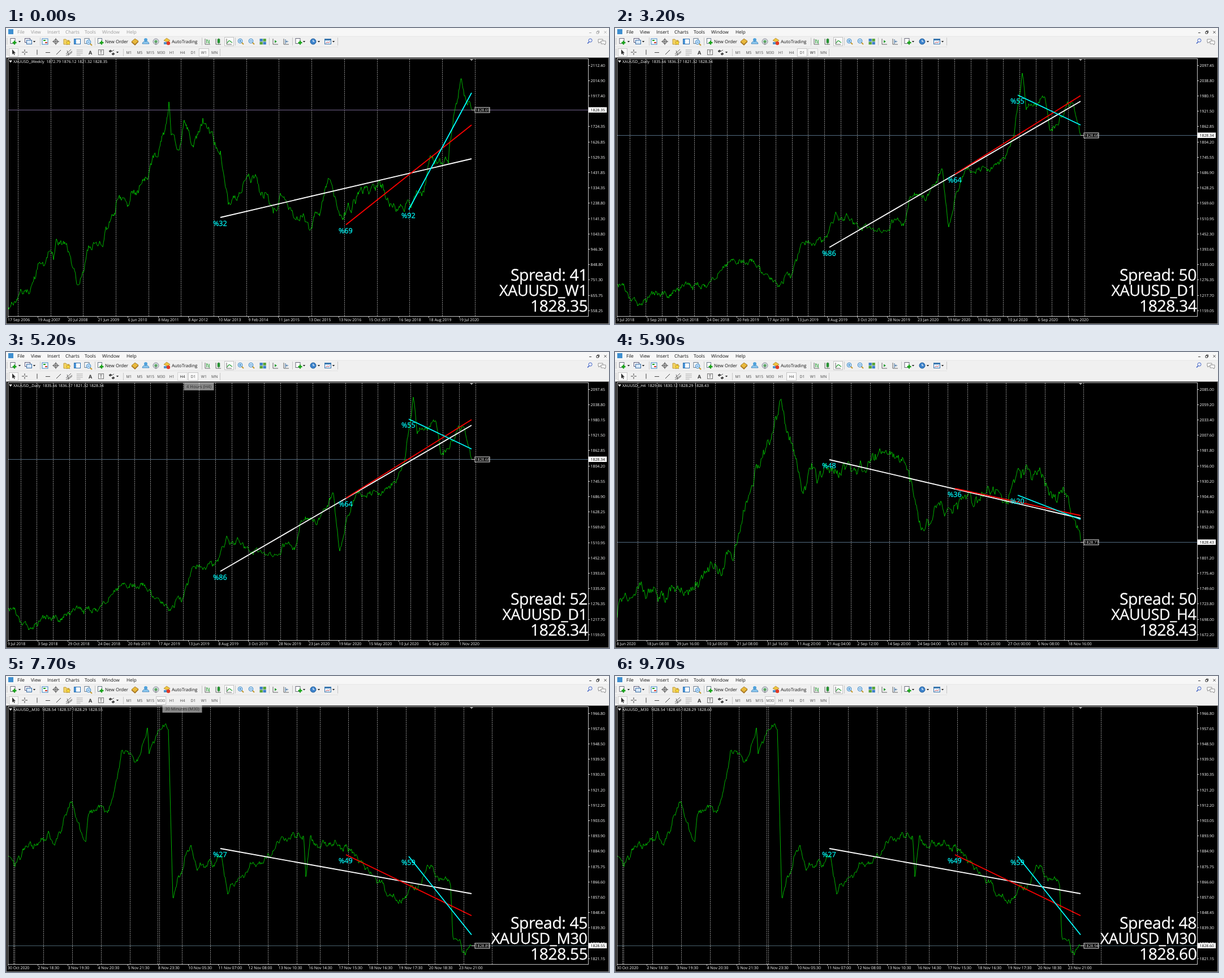
An HTML page for the animation above (10 s loop, 1066 px wide and 525 px high).

```html
<!DOCTYPE html>
<html lang="en">
<head>
<meta charset="utf-8">
<title>Chart periods</title>
<style>
html, body { margin: 0; width: 100%; height: 100%; overflow: hidden; background: #000; }
svg { display: block; width: 1066px; height: 525px; }
text { font-family: "Open Sans", "Noto Sans", sans-serif; white-space: pre; text-rendering: geometricPrecision; }
.big { letter-spacing: -0.4px; stroke: #fff; stroke-width: 0.3px; }
.mark { stroke: #0ff; stroke-width: 0.25px; }
</style>
</head>
<body>
<svg id="stage" viewBox="0 0 1066 525"></svg>
<script>
const LOOP = 10000;
const stage = document.getElementById('stage');

function add(parent, tag, attrs, content) {
  const el = document.createElementNS('http://www.w3.org/2000/svg', tag);
  for (const k in attrs) el.setAttribute(k, attrs[k]);
  if (content !== undefined) el.textContent = content;
  parent.appendChild(el);
  return el;
}
const group = parent => add(parent, 'g', {});
const rect = (p, x, y, width, height, fill, stroke = 'none') =>
  add(p, 'rect', { x, y, width, height, fill, stroke });
const path = (p, d, stroke, width = 1, fill = 'none') =>
  add(p, 'path', { d, stroke, 'stroke-width': width, fill });
const dashes = (p, d, stroke, width, pattern) =>
  path(p, d, stroke, width).setAttribute('stroke-dasharray', pattern);
const circle = (p, cx, cy, r, fill, stroke = 'none') =>
  add(p, 'circle', { cx, cy, r, fill, stroke });
const label = (p, x, y, size, fill, content, anchor = 'start', style = '') =>
  add(p, 'text', { x, y, 'font-size': size, fill, 'text-anchor': anchor, class: style }, content);

// ---- window frame and toolbars ----
rect(stage, 0, 0, 1066, 525, '#f0f0f0');
rect(stage, 0, 0, 1066, 14.5, '#f7f7f7');
rect(stage, 1, 52, 1064, 472, '#000');
path(stage, 'M0 52.5H1066M.5 52V525M1065.5 52V525M0 524.5H1066', '#8c8c8c');
path(stage, 'M0 33.5H587M0 15H1066', '#dedede', 0.7);

const menu = group(stage);
[['File', 20], ['View', 44], ['Insert', 73], ['Charts', 105], ['Tools', 139], ['Window', 170], ['Help', 213]]
  .forEach(([name, x]) => label(menu, x, 10, 8.2, 'currentColor', name));
path(menu, 'M1031 8.5h4M1044 6.5h3.5v3.5h-3.5zM1045.5 6.5v-1.5h3v3.5h-1M1057.5 5.5l4 4m0-4l-4 4', 'currentColor', 0.8);

const bar = group(stage);
rect(bar, 4, 2, 9, 9, '#3f8fd0');
for (const x of [60, 157, 346, 405, 465, 506, 586]) path(bar, `M${x}.5 17V31`, '#bbb', 0.8);
for (const x of [207, 378]) path(bar, `M${x}.5 37V50`, '#bbb', 0.8);
for (const y of [24, 43]) dashes(bar, `M2 ${y - 6}v12`, '#aaa', 1.2, '1 1');
for (const [x, y] of [[24, 23], [50, 23], [527, 23], [553, 23], [579, 23], [197, 42]])
  path(bar, `M${x - 2.2} ${y}h4.4l-2.2 2.6z`, 'none', 1, '#222');

const plus = (x, y) => path(bar, `M${x - 3.5} ${y}h7M${x} ${y - 3.5}v7`, '#16a316', 2.4);
const box = (x, y, w, h, fill, stroke) => rect(bar, x - w / 2, y - h / 2, w, h, fill, stroke);
const lens = (x, y, sign) => {
  path(bar, `M${x + 2} ${y + 2}l4 4`, '#c59a2e', 2);
  circle(bar, x, y, 3.8, '#dcefff', '#2d7fc4');
  path(bar, sign, '#2d7fc4', 1.2);
};
box(12, 23, 8, 9, '#fff', '#667'); plus(15, 26);
box(38, 22, 9, 7, '#fff', '#557'); box(41, 25, 9, 7, '#d8e8f8', '#3b6ea5');
box(69, 24, 10, 10, '#fff', '#3683c4');
path(bar, 'M66 22h4', '#20a020', 2); path(bar, 'M69 26h4', '#d03a2a', 2);
circle(bar, 88, 24, 3.5, 'none', '#444'); path(bar, 'M82 24h12M88 18v12', '#444');
path(bar, 'M102 20h4l1 2h5v7h-10z', '#b08a20', 0.8, '#f5d567');
path(bar, 'M110 22l1 2.5 3 .3-2 2 .5 3-2.5-1.5-2.5 1.5.5-3-2-2 3-.3z', '#a67b10', 0.6, '#ffdf40');
box(126, 24, 11, 9, '#fff', '#2b6fb0'); rect(bar, 121, 20, 3, 8, '#4b97da');
box(143, 23, 8, 9, '#fff', '#678'); lens(146, 25, 'M144 25h4');
box(166, 23, 7, 9, '#fff', '#678'); plus(169, 26);
label(bar, 175, 27, 8.1, '#111', 'New Order');
path(bar, 'M222 24l6-5 6 4-6 6z', '#94691a', 0.8, '#e9b93c'); path(bar, 'M222 25l6 5 6-6', '#a8741a', 1.3);
circle(bar, 247, 21, 3, '#4fa2dc'); path(bar, 'M241 28q1-5 6-4q5-1 6 4z', '#2f78b4', 0.8, '#8fcaf0');
circle(bar, 265, 24, 5, '#d7dde0', '#889'); circle(bar, 265, 24, 2.6, '#58ad62'); path(bar, 'M265 24v6', '#777');
path(bar, 'M279 22l5-4 6 4-5 3z', '#a67d18', 0.7, '#f0c541'); box(283, 27, 8, 4, '#4f93c8');
circle(bar, 287, 27, 3.2, '#e03a26');
label(bar, 293, 27, 8, '#111', 'AutoTrading');
rect(bar, 386.5, 16.5, 16, 15, '#fafafa', '#c4c4c4');
path(bar, 'M352 19v10h9M371 19v10h9M390 19v10h9', '#555', 0.9);
path(bar, 'M355 20v7m0-5h2M359 21v7m-2-3h2', '#1e9b2d', 1.1);
box(376, 23, 3.5, 6, '#28b03a', '#177a22'); path(bar, 'M376 18v11', '#177a22', 0.8);
path(bar, 'M391 27q3-6 5-4t4 3', '#1e9b2d', 1.1);
lens(414, 23, 'M412 23h4M414 21v4'); lens(433, 23, 'M431 23h4');
for (let i = 0; i < 4; i++)
  rect(bar, 448.5 + i % 2 * 6, 19 + (i >> 1) * 5.5, 5.3, 4.8, i % 3 ? '#56a436' : '#3c7fc9');
for (const x of [476, 495]) path(bar, `M${x - 4} 19v10h9`, '#555', 0.9);
path(bar, 'M475 21.5v5l4-2.5z', 'none', 1, '#1e9b2d');
path(bar, 'M494 20v8m5-4h-4m1.5-1.5l-1.5 1.5 1.5 1.5', '#35689c');
box(516, 23, 8, 9, '#fff', '#667'); plus(520, 26);
circle(bar, 543, 24, 5, '#3b82cc', '#205c98'); path(bar, 'M543 21v3h2.5', '#fff', 1.1);
box(569, 24, 11, 9, '#e7f3fd', '#3977af'); path(bar, 'M564 21h10', '#3977af', 2); path(bar, 'M565 27l3-2 2 1 3-2', '#c33', 0.8);
circle(bar, 1033, 22, 3, '#fff', '#3c5fc4'); path(bar, 'M1031 24.5l-3 3', '#3c5fc4', 1.6);
path(bar, 'M1047 20h8v5h-5l-2 2v-2h-1z', '#777', 0.8, '#fff'); path(bar, 'M1052 23h8v5h-1v2l-2-2h-5z', '#777', 0.8, '#fff');

rect(bar, 5.5, 36.5, 16, 14, '#fafafa', '#c4c4c4');
path(bar, 'M11 38v9l2-2 1.5 3 1.3-.7-1.5-2.8h2.8z', 'none', 1, '#333');
path(bar, 'M28 43h4m2 0h4M33 38v4m0 2v4M55 38.5v9M70 43.5h8M89 47l8-8', '#444');
path(bar, 'M106 46l9-8M106 49l11-8M109 49l8-6M108 40l3 8', '#555', 0.9);
dashes(bar, 'M125 39h11M125 42h11M125 45h11M125 48h7', '#777', 0.8, '1.5 .7');
label(bar, 149, 46.5, 9, '#333', 'A', 'middle').setAttribute('font-weight', 700);
box(168, 43, 9, 9, 'none', '#777'); label(bar, 168, 46.3, 8, '#333', 'T', 'middle');
path(bar, 'M182 41l3-2 2 2-3 2zM187 46l3-2 2 2-3 2z', '#333', 1, '#555'); path(bar, 'M186 42l5-3', '#555');

const buttons = {};
['M1', 'M5', 'M15', 'M30', 'H1', 'H4', 'D1', 'W1', 'MN'].forEach((name, i) => {
  const x = 217.5 + i * 18.9;
  const frame = rect(bar, x - 8.5, 36.5, 17, 14, '#fafafa', '#c4c4c4');
  const text = label(bar, x, 45.6, 6.8, '#444', name, 'middle');
  buttons[name] = { frame, text };
});

// ---- charts ----
function random(seed) {
  return () => {
    seed = (seed + 0x6D2B79F5) | 0;
    let r = Math.imul(seed ^ seed >>> 15, 1 | seed);
    r = r + Math.imul(r ^ r >>> 7, 61 | r) ^ r;
    return ((r ^ r >>> 14) >>> 0) / 4294967296;
  };
}
const parse = s => s.split(' ').map(p => p.split(',').map(Number));
const series = (from, step, n) => Array.from({ length: n }, (_, i) => from + step * i);

// Joins the turning points by midpoint displacement, like a price walk.
function walk(points, rough, seed) {
  const rnd = random(seed);
  const join = ([x0, y0], [x1, y1]) => {
    const dx = x1 - x0;
    if (dx < 1.8) return `L${x1.toFixed(1)} ${y1.toFixed(1)}`;
    const mid = [x0 + dx / 2, (y0 + y1) / 2 + (rnd() - 0.5) * rough * Math.min(5, Math.sqrt(dx))];
    return join([x0, y0], mid) + join(mid, [x1, y1]);
  };
  return 'M' + points[0] + points.slice(1).map((p, i) => join(points[i], p)).join('');
}

const weekly = parse('4,495 36,469 80,397 84,411 88,379 106,384 125,454 146,386 170,387 188,331 249,266 270,218 288,131 292,190 306,217 314,166 330,208 348,160 379,218 393,313 434,271 478,325 485,293 537,359 568,276 595,340 624,290 655,280 692,324 735,298 750,226 782,240 785,199 804,90 823,145');
const daily = parse('4,455 40,493 100,471 160,459 187,430 216,418 283,447 313,436 331,380 370,374 389,331 427,345 480,361 512,345 520,303 550,306 579,252 590,353 601,302 617,259 664,250 703,200 720,80 727,145 761,129 768,178 809,133 823,190');
const hourly = parse('4,287 28,195 38,179 72,206 78,280 95,284 97,230 140,262 174,228 192,259 229,185 256,261 289,278 330,241 350,247 357,330 385,363 405,304 412,331 468,226 474,289 504,215 514,118 552,91 557,387 570,306 600,312 606,387 656,283 715,310 748,390 782,339 803,365 806,455 823,478');
const halfHourly = parse('4,320 16,338 75,275 84,298 117,224 141,294 146,245 184,230 204,133 230,152 250,92 253,138 281,86 287,95 295,393 327,300 338,345 380,318 392,387 445,333 490,286 526,284 530,356 538,284 600,302 632,335 677,390 735,367 745,335 786,372 790,462 812,495 823,479');

// The four-hour view is the tail of the daily one, stretched.
const dailyPrice = y => 2097.45 - 58.65 * (y - 66) / 27.2;
const fourHourly = daily.filter(p => p[0] >= 664)
  .map(([x, y]) => [4 + (x - 664) * 5.151, 66 + (2085 - dailyPrice(y)) * 1.054]);
const intraday = i => 1966.8 - 0.15 * Math.ceil(60.67 * i - 0.045);

const charts = {
  W1: {
    title: 'XAUUSD_,Weekly', ohl: '1872.79 1876.12 1821.32', points: weekly, rough: 7, y: 145, bid: '#74648f',
    price: i => 2112.4 - 1.95 * Math.round(49.8333 * i - 0.01),
    days: series(21.3, 57.7, 15), trend: [336, 232, 349, 172, 322, 115], marks: [32, 69, 92],
    dates: '17 Sep 2006|19 Aug 2007|20 Jul 2008|21 Jun 2009|6 Jun 2010|8 May 2011|8 Apr 2012|10 Mar 2013|9 Feb 2014|11 Jan 2015|13 Dec 2015|13 Nov 2016|15 Oct 2017|16 Sep 2018|18 Aug 2019|19 Jul 2020'
  },
  D1: {
    title: 'XAUUSD_,Daily', ohl: '1835.66 1836.37 1821.32', points: daily, rough: 5, y: 190, bid: '#536b82',
    price: i => 2097.45 - 58.65 * i,
    days: series(26, 28.72, 29), trend: [389, 130, 259, 120, 119, 172], marks: [86, 64, 55],
    dates: '9 Jul 2018|3 Sep 2018|29 Oct 2018|24 Dec 2018|20 Feb 2019|17 Apr 2019|13 Jun 2019|8 Aug 2019|3 Oct 2019|28 Nov 2019|23 Jan 2020|19 Mar 2020|15 May 2020|10 Jul 2020|6 Sep 2020|1 Nov 2020'
  },
  H4: {
    title: 'XAUUSD_,H4', ohl: '1829.86 1830.12 1828.29', points: fourHourly, rough: 9, y: 337, bid: '#536b82',
    price: i => 2085 - 25.8 * i,
    days: series(40, 34.3, 24), trend: [191, 295, 242, 290, 254, 297], marks: [48, 36, 20],
    dates: '8 Jun 2020|18 Jun 08:00|29 Jun 16:00|10 Jul 00:00|21 Jul 08:00|31 Jul 16:00|11 Aug 20:00|21 Aug 04:00|2 Sep 12:00|14 Sep 20:00|24 Sep 04:00|6 Oct 12:00|16 Oct 20:00|27 Oct 00:00|6 Nov 08:00|18 Nov 16:00'
  },
  H1: {
    title: 'XAUUSD_,H1', points: hourly, rough: 6, y: 478, bid: '#47616c', price: intraday,
    days: [...series(9.5, 25.55, 22), ...series(32.5, 127.7, 5), ...series(567, 24.9, 12)],
    trend: [244, 367, 306, 387, 318, 426], marks: [20, 27, 49],
    dates: '8 Oct 2020|12 Oct 20:00|14 Oct 23:00|19 Oct 01:00|21 Oct 03:00|23 Oct 05:00|27 Oct 07:00|29 Oct 09:00|2 Nov 12:00|4 Nov 14:00|6 Nov 16:00|10 Nov 23:00|13 Nov 01:00|17 Nov 07:00|19 Nov 09:00|23 Nov 12:00'
  },
  M30: {
    title: 'XAUUSD_,M30', points: halfHourly, rough: 5, y: 478, bid: '#47616c', price: intraday,
    days: [...series(15.5, 51.1, 6), ...series(13.5, 255, 2), ...series(311, 50.8, 5), ...series(555, 50.8, 7)],
    trend: [306, 386, 317, 425, 320, 459], marks: [27, 49, 59],
    dates: '30 Oct 2020|2 Nov 18:30|3 Nov 19:30|4 Nov 20:30|5 Nov 21:30|8 Nov 23:30|10 Nov 05:30|11 Nov 07:00|12 Nov 08:00|13 Nov 10:30|16 Nov 14:30|17 Nov 15:30|18 Nov 16:30|19 Nov 17:30|20 Nov 18:30|23 Nov 21:00'
  }
};

Object.values(charts).forEach((c, n) => {
  const g = c.group = group(stage);
  for (const x of c.days) dashes(g, `M${Math.floor(x) + 0.5} 55V511`, '#fff', 0.7, '1.67 1.67');
  path(g, `M3 ${c.y + 0.5}H1029`, c.bid);
  path(g, walk(c.points, c.rough, 11 + n), '#0f0', 0.7);
  ['#fff', '#f00', '#0ff'].forEach((color, i) => {
    const x = [379, 601, 712][i], y = c.trend[i * 2];
    path(g, `M${x} ${y}L823 ${c.trend[i * 2 + 1]}`, color, 1.8);
    label(g, x - 0.6, y + 15, 12.6, '#0ff', '%' + c.marks[i], 'middle', 'mark');
  });
  for (let i = 0; i < 17; i++) {
    const y = 66 + i * 27.2;
    path(g, `M1029 ${Math.floor(y) + 0.5}h3`, '#fff', 0.8);
    label(g, 1033.5, y + 2.5, 6.9, '#fff', c.price(i).toFixed(2));
  }
  c.dates.split('|').forEach((date, i) => {
    const x = 3 + i * 53.2;
    path(g, `M${Math.floor(x) + 0.5} 511v3`, '#fff', 0.8);
    label(g, x, 520, 6.9, '#fff', date);
  });
});

path(stage, 'M3 54.5H1029M3 511.5H1029M1029.5 54V512M3.5 54V512', '#ddd', 0.9);
path(stage, 'M819.5 54.5h7l-3.5 4z', 'none', 1, '#999');
path(stage, 'M5 57.5h6l-3 4z', 'none', 1, '#fff');

// ---- changing text ----
const title = label(stage, 13, 62.3, 6.95, '#fff', '');
const spreadText = label(stage, 1028, 448, 28.3, '#fff', '', 'end', 'big');
const symbolText = label(stage, 1027.5, 475, 27, '#fff', '', 'end', 'big');
const bidText = label(stage, 1028.5, 503.3, 28.2, '#fff', '', 'end', 'big');
const tags = group(stage);
rect(tags, 1030, -4.5, 32, 9.5, '#fff');
const bidTag = label(tags, 1033.5, 2.8, 6.9, '#000', '');
path(tags, 'M823 .5h6', '#ddd');
rect(tags, 829, -4, 26, 9, '#000', '#eee');
const askTag = label(tags, 829.5, 3, 6.9, '#fff', '');

function makeTip(x, y, w, content) {
  const g = group(stage);
  rect(g, x, y, w, 13.5, '#fff');
  label(g, x + w / 2, y + 9.5, 7.5, '#505050', content, 'middle');
  return g;
}
const tips = {
  H4: makeTip(314.5, 54.5, 53, '4 Hours (H4)'),
  M30: makeTip(276.5, 51.5, 70, '30 Minutes (M30)')
};

// ---- timeline: time, period, bid in cents above 1828, spread ----
const quotes = [
  [0, 'W1', 35, 41], [1000, 'W1', 43, 45], [1600, 'W1', 54, 50],
  [2700, 'D1', 34, 50], [3600, 'D1', 36, 51], [3900, 'D1', 36, 48], [4500, 'D1', 36, 53], [4900, 'D1', 34, 52],
  [5300, 'H4', 34, 52], [5800, 'H4', 43, 50], [6400, 'H4', 55, 48],
  [6600, 'H1', 55, 48], [7100, 'H1', 57, 46], [7400, 'H1', 55, 45],
  [7600, 'M30', 55, 45], [9000, 'M30', 65, 47], [9200, 'M30', 65, 46], [9500, 'M30', 60, 48]
];
// time, pressed button, hovered button
const clicks = [
  [0, 'W1'], [2200, 'W1', 'D1'], [2700, 'D1', 'W1'], [4100, 'D1'], [4900, 'D1', 'H4'], [5300, 'H4'],
  [6400, 'H4', 'H1'], [6700, 'H1'], [7100, 'H1', 'M30'], [7600, 'M30']
];
// time, tip, opacity
const tipSteps = [[0], [5100, 'H4', 0.53], [5300], [7600, 'M30', 0.53], [7900, 'M30', 0.25], [8200]];
const at = (steps, t) => steps.filter(s => s[0] <= t).pop();
const money = cents => (1828 + cents / 100).toFixed(2);

function draw(t) {
  const [, period, bid, spread] = at(quotes, t);
  const chart = charts[period];
  for (const name in charts) charts[name].group.style.display = name === period ? '' : 'none';

  const high = Math.max(...quotes.filter(q => q[0] >= 6400 && q[0] <= t).map(q => q[2]));
  const ohl = chart.ohl || `1828.54 ${money(high)} 1828.29`;
  title.textContent = `${chart.title}  ${ohl} ${money(bid)}`;
  spreadText.textContent = 'Spread: ' + spread;
  symbolText.textContent = 'XAUUSD_' + period;
  bidText.textContent = bidTag.textContent = money(bid);
  askTag.textContent = money(bid + 34);
  tags.setAttribute('transform', `translate(0 ${chart.y})`);

  const [, pressed, hover] = at(clicks, t);
  for (const name in buttons) {
    const { frame, text } = buttons[name];
    frame.style.opacity = name === pressed ? 1 : name === hover ? 0.6 : 0;
    text.setAttribute('fill', name === hover ? '#111' : '#444');
  }
  const [, tip, opacity] = at(tipSteps, t);
  for (const name in tips) tips[name].style.opacity = name === tip ? opacity : 0;
  menu.style.color = t < 2600 ? '#999' : '#111';
}

const start = performance.now();
let last = -1;
function tick() {
  const t = Math.floor((performance.now() - start) % LOOP / 100) * 100;
  if (t !== last) draw(last = t);
  requestAnimationFrame(tick);
}
tick();
</script>
</body>
</html>
```
